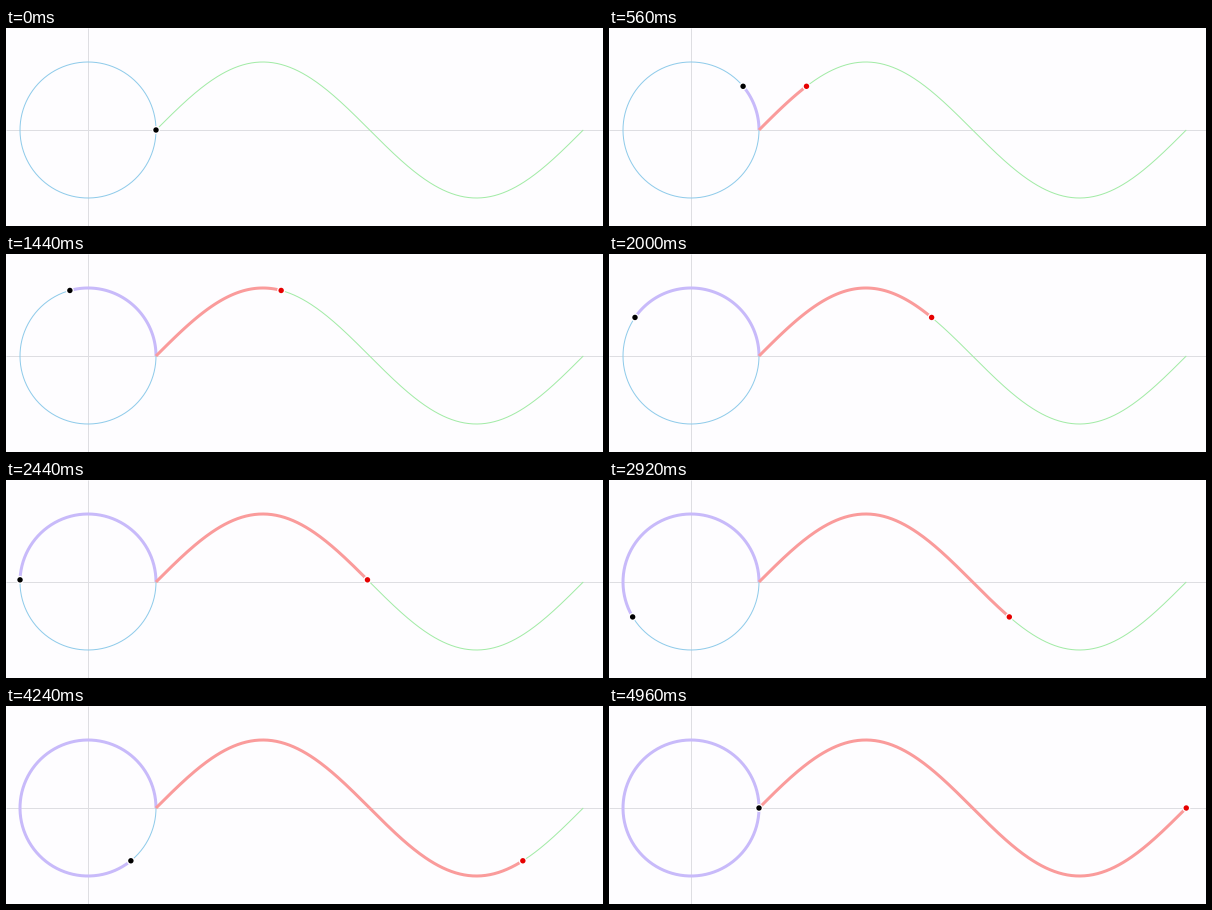
Write a matplotlib script that moves like this. It is 597 by 198 pixels and loops after 5000 ms.

```python
import numpy as np
import matplotlib.pyplot as plt
from matplotlib.animation import FuncAnimation
from matplotlib.patches import Circle

W, H = 597, 198
DPI = 64
PX = 72 / DPI              # points per pixel
CX, CY, R = 82, 102, 68
SLOTS, STEPS = 125, 100    # 40 ms slots showing 20 steps per second
BG = "#fefdff"

fig = plt.figure(figsize=(W / DPI, H / DPI), dpi=DPI, facecolor=BG)
ax = fig.add_axes([0, 0, 1, 1])
ax.set_xlim(0, W)
ax.set_ylim(H, 0)
ax.axis("off")


def on_circle(a):
    return CX + R * np.cos(a), CY - R * np.sin(a)


def on_wave(a):
    return CX + R + R * a, CY - R * np.sin(a)


def stroke(xy, color, width, z):
    line, = ax.plot(*xy, color=color, lw=width * PX, zorder=z,
                    solid_capstyle="butt", solid_joinstyle="round")
    return line


def dot(color, z):
    ax.add_patch(Circle((0, 0), 4, fc=BG, lw=0, zorder=z))
    ax.add_patch(Circle((0, 0), 2.7, fc=color, lw=0, zorder=z + 1))
    return ax.patches[-2:]


turn = np.linspace(0, 2 * np.pi, 400)
stroke(([CX - 0.5] * 2, [0, H]), "#dedee2", 1, 1)
stroke(([0, W], [CY - 0.5] * 2), "#dedee2", 1, 1)
stroke(on_circle(turn), "#8fcbea", 1, 2)
stroke(on_wave(turn), "#a2eba6", 1, 2)

arc = stroke(([], []), "#c8bafa", 3, 3)
trace = stroke(([], []), "#fa9b9b", 3, 4)
red = dot("#e60000", 5)
black = dot("#000000", 7)


def update(slot):
    step = (4 * slot + 1) // 5
    angle = 2 * np.pi * step / (STEPS - 1)
    path = np.linspace(0, angle, 3 * step + 2)
    arc.set_data(*on_circle(path))
    trace.set_data(*on_wave(path))
    for part in red:
        part.center = on_wave(angle)
    for part in black:
        part.center = on_circle(angle)
    return [arc, trace, *red, *black]


anim = FuncAnimation(fig, update, frames=SLOTS, interval=40,
                     repeat=True, repeat_delay=0, blit=False)
plt.show()
```
